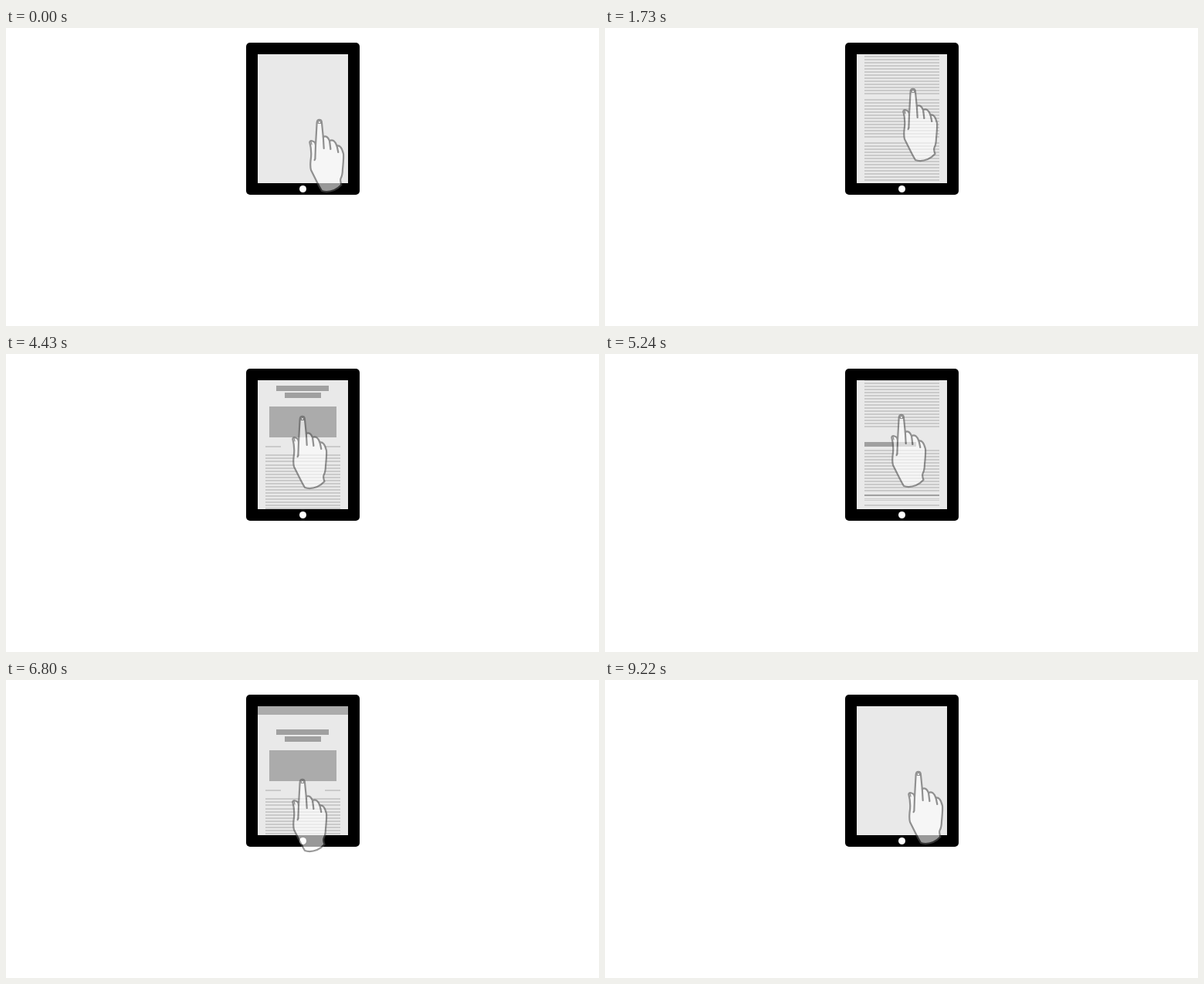
Recreate the animation shown at these times as an HTML page. Size 768x386 px, loop 9280 ms.

```html
<!DOCTYPE html>
<html lang="en">
<head>
<meta charset="utf-8">
<title>Swiping through pages on a tablet</title>
<style>
  html, body { margin: 0; width: 100%; height: 100%; overflow: hidden; background: #fff; }
  svg { display: block; }

  .text { fill: none; stroke: #cacaca; stroke-width: 97; stroke-dasharray: 2 2; }
  .list { stroke-dasharray: 2 6; }
  .thin { fill: #cacaca; }
  .title { fill: #a0a0a0; }
  .image { fill: #ababab; }
  .hand { opacity: .6; fill: none; stroke: #555; stroke-width: 2.2; stroke-linecap: round; stroke-linejoin: round; }

  .strip, .first, .second, .hand { animation: 9280ms linear infinite; }
  .strip { animation-name: turn; }
  .first { animation-name: scroll-first; }
  .second { animation-name: scroll-second; }
  .hand { animation-name: swipe; }

  /* Pages move in whole pixels so that the text lines stay crisp. */
  @keyframes turn {
    0% { transform: translateX(0); }
    5.388% { transform: translateX(0); animation-timing-function: steps(117, start); }
    12.5% { transform: translateX(-117px); }
    36.207% { transform: translateX(-117px); animation-timing-function: steps(117, start); }
    42.672% { transform: translateX(-234px); }
    76.724% { transform: translateX(-234px); animation-timing-function: steps(117, start); }
    83.836% { transform: translateX(-117px); }
    90.948% { transform: translateX(-117px); animation-timing-function: steps(117, start); }
    99.353%, 100% { transform: translateX(0); }
  }
  @keyframes scroll-first {
    0% { transform: translateY(0); }
    15.733% { transform: translateY(0); animation-timing-function: steps(74, start); }
    22.522% { transform: translateY(-74px); }
    26.832% { transform: translateY(-74px); animation-timing-function: steps(74, start); }
    32.651%, 100% { transform: translateY(0); }
  }
  @keyframes scroll-second {
    0% { transform: translateY(0); }
    45.474% { transform: translateY(0); animation-timing-function: steps(224, start); }
    60.022% { transform: translateY(-224px); }
    63.254% { transform: translateY(-224px); animation-timing-function: steps(224, start); }
    73.922%, 100% { transform: translateY(0); }
  }
  @keyframes swipe {
    0%, 4.741% { transform: translate(0, 0); }
    7.812%, 15.086% { transform: translate(-7px, 0); }
    18.157%, 26.185% { transform: translate(-7px, -40px); }
    29.256%, 35.56% { transform: translate(-7px, 0); }
    38.631%, 44.828% { transform: translate(-22px, 0); }
    47.899%, 62.607% { transform: translate(-22px, -40px); }
    65.679%, 76.078% { transform: translate(-22px, 10px); }
    79.149%, 90.302% { transform: translate(-12px, 10px); }
    93.373%, 100% { transform: translate(0, 0); }
  }
</style>
</head>
<body>
<svg width="768" height="386" viewBox="0 0 768 386">
  <rect x="311" y="19" width="147" height="197" rx="5"/>
  <circle cx="384.5" cy="208.5" r="4.5" fill="#fff"/>

  <svg x="326" y="34" width="117" height="167">
    <rect width="117" height="167" fill="#e9e9e9"/>
    <g class="strip">
      <g transform="translate(117 0)">
        <g class="first">
          <rect class="title" x="26" y="16" width="67" height="6"/>
          <path class="text" d="M58.5 26V84"/>
          <path class="text" d="M58.5 90V140"/>
          <path class="text" d="M58.5 146V196"/>
          <path class="text" d="M58.5 202V236"/>
        </g>
      </g>
      <g transform="translate(234 0)">
        <g class="second">
          <rect class="image" width="117" height="24"/>
          <rect class="title" x="24" y="43" width="68" height="7"/>
          <rect class="title" x="35" y="52" width="47" height="7"/>
          <rect class="image" x="15" y="70" width="87" height="40"/>
          <path class="thin" d="M10 121h20v2h-20zM87 121h20v2h-20z"/>
          <path class="text" d="M58.5 132V142"/>
          <path class="text" d="M58.5 145V231"/>
          <rect class="title" x="10" y="250" width="67" height="6"/>
          <path class="text" d="M58.5 260V314"/>
          <rect class="title" x="10" y="318" width="97" height="2"/>
          <path class="thin" d="M10 323h97v1h-97zM10 325h97v1h-97z"/>
          <path class="text list" d="M58.5 331V389"/>
        </g>
      </g>
    </g>
  </svg>

  <g class="hand">
    <path fill="#fff" d="M401 152L402.6 123Q402.8 118.8 405.8 118.8Q408.7 118.8 408.9 122L410.8 141
      Q416 138.5 419 146Q425 143 428.5 152.5Q434 151 437 163Q437.5 168 436 183Q435.8 191 433.5 195
      Q432.5 198 434.5 203Q430 208 425 210Q416 213.5 409 211Q406 206 403.5 201L395 184
      Q393.8 180 394.5 172Q396.5 160 393.3 148Q394 145.5 397 146.5Q400.5 147 401 152Z"/>
    <path d="M401 152L400.4 169.5L399.6 171M410.8 141L411.7 156M419 146L420.4 157M428.5 152.5L430.3 161"/>
    <path stroke-width="1.2" d="M404 123.5Q404 120.5 406 120.5Q407.8 120.5 407.8 123.5ZM395.2 147.5L396 151"/>
  </g>
</svg>
</body>
</html>
```
